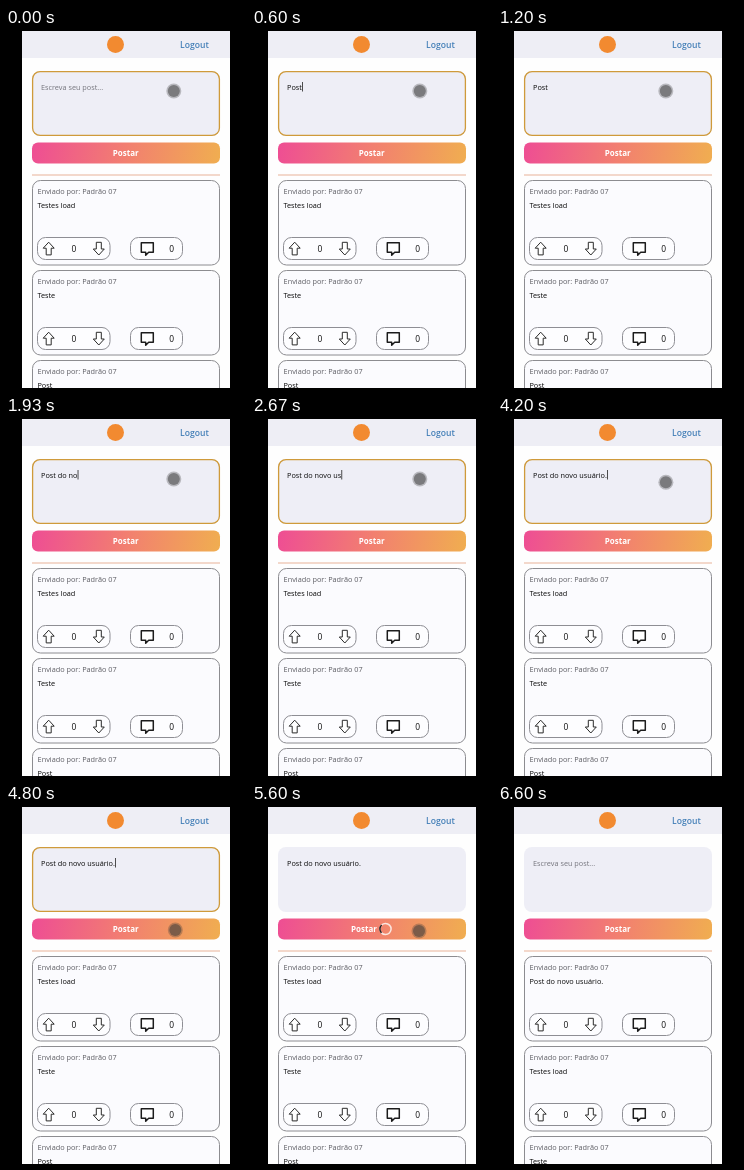
Write an HTML page that moves like this. It is 240x360 px and loops after 6670 ms.

```html
<!DOCTYPE html>
<html lang="pt-BR">
<head>
<meta charset="utf-8">
<title>Postagens</title>
<style>
  html, body { margin: 0; width: 100%; height: 100%; overflow: hidden; background: #000; }
  svg { display: block; width: 240px; height: 360px; }
  text { font: 7.3px "Open Sans", "Noto Sans", sans-serif; white-space: pre; fill: #080808; }
  .logout { font-size: 8.6px; font-weight: 600; fill: #4580b8; }
  .hint { fill: #74747c; }
  .author { fill: #5c5c62; }
  .send { font-size: 8px; font-weight: 700; fill: #fff; text-anchor: middle; }
  .count { font-size: 8.4px; text-anchor: middle; }
  .card { fill: #fbfbfe; stroke: #8c8c90; }
  .pill { fill: #fdfdff; stroke: #8e8e94; }
  .icon { fill: #fff; stroke: #2a2a2a; stroke-width: 1; stroke-linejoin: round; }
</style>
</head>
<body>
<svg viewBox="0 0 240 360">
  <defs>
    <linearGradient id="warm" gradientUnits="userSpaceOnUse" x1="26" y1="110" x2="214" y2="140">
      <stop offset="0" stop-color="#ee4d94"/>
      <stop offset=".5" stop-color="#f27f70"/>
      <stop offset="1" stop-color="#f0ae50"/>
    </linearGradient>
    <clipPath id="screen"><rect x="16" y="3" width="208" height="357"/></clipPath>
    <path id="arrow" class="icon" d="M0-6.5 5.5-.5H2.5V6.2H-2.5V-.5H-5.5Z"/>
    <g id="post">
      <rect class="card" x="26.5" y="152.5" width="187" height="84.5" rx="8"/>
      <text class="author" x="31.6" y="165.6">Enviado por: Padrão 07</text>
      <rect class="pill" x="31.5" y="209.5" width="72.5" height="22" rx="8"/>
      <use href="#arrow" x="42.7" y="220.7"/>
      <text class="count" x="67.8" y="223.8">0</text>
      <use href="#arrow" transform="translate(92.8 220.5) rotate(180)"/>
      <rect class="pill" x="124.5" y="209.5" width="52" height="22" rx="8"/>
      <path class="icon" style="stroke:#1c1c1c;stroke-width:1.5" d="M135.3 214.8h12v9.4h-4.6l-3 3v-3h-4.4z"/>
      <text class="count" x="165.7" y="223.8">0</text>
    </g>
  </defs>
  <g clip-path="url(#screen)">
    <rect x="16" y="3" width="208" height="357" fill="#fefefe"/>
    <rect x="16" y="3" width="208" height="27" fill="#eeeef5"/>
    <circle cx="109.5" cy="16.5" r="8.5" fill="#f28a30"/>
    <text class="logout" x="174" y="19.8">Logout</text>

    <rect x="26" y="43" width="188" height="65" rx="8" fill="#eeeef6"/>
    <rect id="focus" x="26.6" y="43.6" width="186.8" height="63.8" rx="7.5" fill="none" stroke="#cf9a3a" stroke-width="1.3"/>
    <text id="hint" class="hint" x="35" y="61.6">Escreva seu post...</text>
    <text id="typed" x="35" y="61.6"></text>
    <rect id="caret" y="54" width=".8" height="9.5" fill="#222"/>

    <rect x="26" y="114.5" width="188" height="21" rx="6" fill="url(#warm)"/>
    <text id="send" class="send" x="119.8" y="128">Postar</text>
    <g id="spinner" fill="none" stroke-width="1.5">
      <circle r="5.6" stroke="#fbe6df"/>
      <path d="M3.96-3.96A5.6 5.6 0 0 1 3.96 3.96" stroke="#2b2224"/>
    </g>
    <rect x="26" y="146.5" width="188" height="1" fill="#eab49a"/>

    <use href="#post"/>
    <use href="#post" y="90"/>
    <use href="#post" y="180"/>
    <text class="title" x="31.4" y="179.6"></text>
    <text class="title" x="31.4" y="269.6"></text>
    <text class="title" x="31.4" y="359.6"></text>

    <g id="pointer" fill="#3c3c3c">
      <circle r="7.5" fill-opacity=".3"/>
      <circle r="6" fill-opacity=".5"/>
    </g>
  </g>
</svg>
<script>
const LOOP = 6670, STEP = 66.7, BLINK = 530;
const SENT = 5130, DONE = 6270;
const MESSAGE = 'Post do novo usuário.';
const FEED = ['Testes load', 'Teste', 'Post'];

// Key times in ms, one per character of MESSAGE
const KEYS = [200, 330, 460, 600, 1270, 1400, 1530, 1660, 1800, 1930,
  2060, 2200, 2330, 2470, 2600, 2730, 3060, 3260, 3460, 3660, 3730];

// Pointer stops: time, x, y
const PATH = [[0, 167.8, 63], [4130, 167.8, 63], [4660, 169.3, 126], [5000, 169.3, 126],
  [5270, 167, 127], [5900, 167, 127], [6400, 234, 134]];

const $ = id => document.getElementById(id);
const [focus, hint, typed, caret, send, spinner, pointer] =
  ['focus', 'hint', 'typed', 'caret', 'send', 'spinner', 'pointer'].map($);
const titles = document.querySelectorAll('.title');

const show = (el, on) => el.setAttribute('visibility', on ? 'visible' : 'hidden');
const ease = p => p * p * (3 - 2 * p);

function pointerAt(t) {
  const i = PATH.findIndex(p => p[0] > t);
  if (i < 0) return PATH[PATH.length - 1].slice(1);
  const a = PATH[i - 1], b = PATH[i];
  const p = ease((t - a[0]) / (b[0] - a[0]));
  return [a[1] + (b[1] - a[1]) * p, a[2] + (b[2] - a[2]) * p];
}

function draw(t) {
  const busy = t >= SENT && t < DONE, done = t >= DONE;
  const count = done ? 0 : KEYS.filter(k => k <= t).length;
  const sinceKey = count ? t - KEYS[count - 1] : BLINK;

  typed.textContent = MESSAGE.slice(0, count);
  show(hint, !count);
  show(focus, t < SENT);
  show(caret, t < SENT && sinceKey % (2 * BLINK) < BLINK);
  caret.setAttribute('x', 35.2 + (count ? typed.getComputedTextLength() : 0));

  send.setAttribute('x', busy ? 112 : 119.8);
  show(spinner, busy);
  spinner.setAttribute('transform', `translate(133.5 125) rotate(${180 + (t - 5600) * .36})`);

  const feed = done ? [MESSAGE, ...FEED] : FEED;
  titles.forEach((el, i) => { el.textContent = feed[i]; });

  const [x, y] = pointerAt(t);
  pointer.setAttribute('transform', `translate(${x} ${y})`);
}

const start = performance.now();
function tick() {
  const t = (performance.now() - start) % LOOP;
  draw(Math.floor((t + 4) / STEP) * STEP % LOOP);
  requestAnimationFrame(tick);
}
tick();
</script>
</body>
</html>
```
